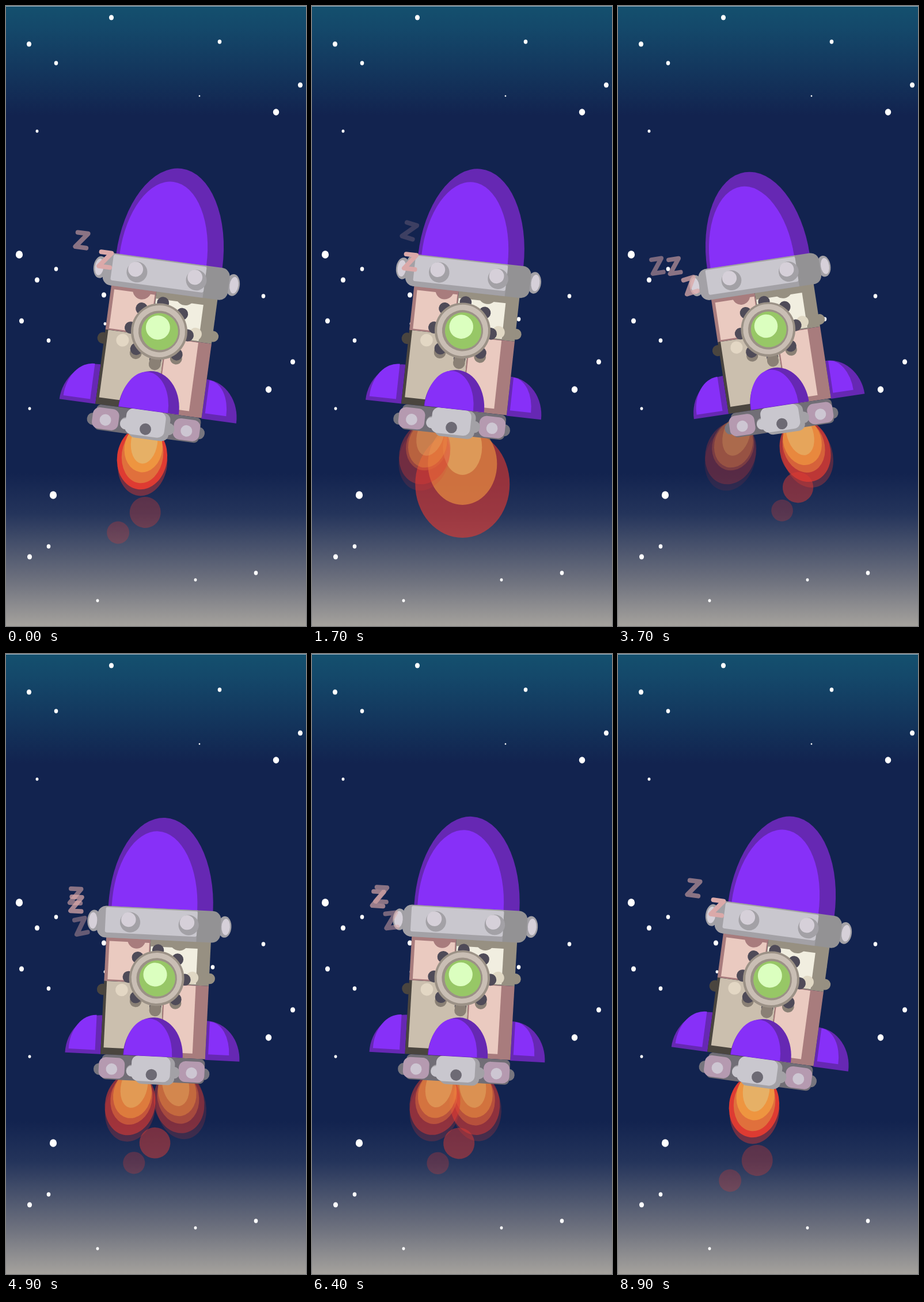
Write an HTML page with a canvas that moves like this. It is 521x1075 px and loops after 9 s.

```html
<!DOCTYPE html>
<html lang="en">
<head>
<meta charset="utf-8">
<title>Rocket</title>
<style>
html, body { margin: 0; width: 100%; height: 100%; overflow: hidden; background: #12234f; }
canvas { display: block; }
</style>
</head>
<body>
<canvas id="stage" width="521" height="1075"></canvas>
<script>
const W = 521, H = 1075, LOOP = 9, TAU = Math.PI * 2;
const g = document.getElementById('stage').getContext('2d');

const C = {
  violet: '#8730f8', plum: '#6628b3', pink: '#eacac0', rose: '#a87c7d', cream: '#f1eee0',
  stone: '#979082', sand: '#cbbfae', coal: '#4a453f', steel: '#a3a1a6', silver: '#c9c7ce',
  pearl: '#d6d0d9', stud: '#4f4b58', shade: '#8a8075', rim: '#9b9186',
  red: '#de3b32', ember: '#e0703c', orange: '#ee9540', gold: '#e6b066'
};

const rad = deg => deg * Math.PI / 180;
const mix = (a, b, k) => a + (b - a) * k;
const clamp = v => Math.min(1, Math.max(0, v));

// The rocket swings between these times and angles; the rest of a pose follows from its angle
const swing = [
  [0, 7.7], [0.5, -17], [1.3, 17.4], [1.98, 0], [2.5, -12], [3.1, 17.4], [4, -17], [4.58, 12.9],
  [5.3, -11.4], [6.05, 13.4], [6.75, -6.7], [7.4, -6.7], [8, 15], [8.5, -4], [8.9, 7.7], [LOOP, 7.7]
];
const poses = swing.map(([t, deg]) => ({
  t, deg,
  a: Math.cos(rad(deg)), b: Math.sin(rad(deg)),
  x: 261.3 + 4.8 * Math.sin(rad(deg * 10)),
  y: 562 + 2.4 * Math.sign(deg),
  big: deg === 0 ? 1 : 0,
  drift: deg < 0 ? 0.6 : clamp((17.4 - deg) / 9.7),
  zs: 2 - Math.sign(deg) * (deg < 0 ? 1 : 0) - (deg === 0 ? 1 : 0)
}));

const place = m => g.setTransform(m.a, m.b, -m.b, m.a, m.x, m.y);
const blend = (p, q, k) => ({
  a: mix(p.a, q.a, k), b: mix(p.b, q.b, k), x: mix(p.x, q.x, k), y: mix(p.y, q.y, k)
});

function oval(x, y, rx, ry, fill, from = 0, to = TAU) {
  g.fillStyle = fill;
  g.beginPath();
  g.ellipse(x, y, rx, ry, 0, from, to);
  g.fill();
}
const dot = (x, y, r, fill) => oval(x, y, r, r, fill);
const dome = (x, y, rx, ry, fill) => oval(x, y, rx, ry, fill, Math.PI, TAU);

// Rectangle given by its edges
function box(l, t, r, b, fill, radius = 0) {
  g.fillStyle = fill;
  g.beginPath();
  g.roundRect(l, t, r - l, b - t, radius);
  g.fill();
}

// Quarter ellipse with its right angle at x, y; negative rx points left
function fin(x, y, rx, ry, fill) {
  g.fillStyle = fill;
  g.beginPath();
  g.moveTo(x, y);
  g.ellipse(x, y, Math.abs(rx), ry, 0, -Math.PI / 2, rx < 0 ? -Math.PI : 0, rx < 0);
  g.fill();
}

// Star positions by radius
const stars = {
  6.3: [[23, 431], [82, 848]],
  5.4: [[469, 184], [456, 665]],
  4.2: [[183, 20], [40, 66], [511, 137], [170, 501], [27, 546], [498, 617], [54, 475], [41, 955]],
  3.4: [[371, 62], [87, 99], [87, 456], [447, 503], [359, 543], [74, 580], [74, 937], [434, 983]],
  2.5: [[54, 217], [172, 551], [41, 698], [329, 995], [159, 1031]],
  1.4: [[336, 156]]
};

const sky = g.createLinearGradient(0, 0, 0, H);
[[0, '#14506e'], [40, '#14486a'], [190, '#12234f'], [810, '#12234f'],
 [880, '#24345b'], [1000, '#70737f'], [H, '#a5a29d']]
  .forEach(([y, c]) => sky.addColorStop(y / H, c));

function drawSky() {
  g.setTransform(1, 0, 0, 1, 0, 0);
  g.fillStyle = sky;
  g.fillRect(0, 0, W, H);
  box(0, 0, W, 1, '#a3b8c5');
  for (const r in stars) stars[r].forEach(([x, y]) => oval(x, y, r * 0.97, r * 1.07, '#fff'));
}

function drawFlame(pose, alpha) {
  const d = pose.drift;
  place(pose);
  g.globalAlpha = alpha;
  if (pose.big) {
    oval(0, 267, 82, 93, C.red);
    oval(0, 232, 60, 71, C.orange);
    oval(0, 203, 34, 48, C.gold);
  } else {
    g.globalAlpha = alpha * 0.45;
    oval(2, 230, 43, 57, C.red);
    g.globalAlpha = alpha;
    oval(0, 221, 43.5, 55, C.red);
    oval(0, 207 + 9 * d, 36, 44 + 5 * d, C.ember);
    oval(0, 204, 33, 42, C.orange);
    oval(0, 187 + 6 * d, 23, 38, C.gold);
  }
  g.globalAlpha = 1;
}

function drawSmoke(m, d, show) {
  place(m);
  g.globalAlpha = show * (0.65 - 0.33 * d);
  dot(4 + 14 * d, 267 + 47 * d, 28 - d, C.red);
  g.globalAlpha = show * clamp(d * 3) * 0.28;
  dot(-24, 300 + 55 * d, 19.5, C.red);
  g.globalAlpha = 1;
}

function drawFins() {
  fin(-93, 139, -63, 69, C.plum);
  fin(-103, 132, -47, 62, C.violet);
  fin(93, 140, 61, 69, C.plum);
  fin(98, 130, 37, 58, C.violet);
}

function drawBase() {
  box(-104, 155, 102, 176, '#77757e', 10);
  box(-90, 139, 93, 183, '#716e76', 8);
  for (const x of [-72, 70]) {
    box(x - 23, 144, x + 23, 181, '#b59ab0', 12);
    dot(x, 164.5, 10, '#cdc6d2');
  }
  box(-30, 139, 40, 188, C.steel, 12);
  box(-46, 155, 49, 176, C.steel, 10);
  box(-46, 157, 10, 176, C.silver, 10);
  box(-37, 138, 32, 183, C.silver, 12);
  dot(-1, 171, 10, '#6d6a74');
}

function drawBody() {
  dot(-95, 24, 10, C.coal);
  dot(94, -4, 9.5, C.stone);
  box(-93, -70, -14, 9, C.rose);
  box(-87, -62, -16, 6, C.pink);
  box(-14, -70, 93, 9, C.stone);
  box(-13, -56, 70, 7, C.cream);
  box(-93, 9, 14, 139, C.coal);
  box(-88, 9, 13, 127, C.sand);
  box(13, 9, 93, 139, C.rose);
  box(15, 10, 70, 130, C.pink);
  dot(-39, -67, 16, C.rose);
  dot(37, -68, 17, C.stone);
  dot(-61, 23.5, 11, '#e3d7c4');
  dot(63, -4, 11, '#e0d8c4');
}

function drawPorthole() {
  const ring = (dy, fill, from, to) => {
    for (let i = from; i < to; i++) {
      const a = i * TAU / 8;
      dot(50 * Math.cos(a), 50 * Math.sin(a) + dy, 10.5, fill);
    }
  };
  ring(7, C.shade, 1, 4);
  ring(0, C.stud, 0, 8);
  dot(0, 53, 10, C.shade);
  dot(0, 0, 49, C.rim);
  dot(0, -0.5, 45, '#c9beb4');
  dot(0, 0, 36, C.rim);
  dot(1, 0, 32, '#97c766');
  dot(-3, -6.5, 21, '#dbffbf');
}

function drawBand() {
  for (const side of [-1, 1]) {
    oval(side * 116, -97, 12, 19, C.steel);
    oval(side * 118, -97, 7.5, 14.5, C.pearl);
  }
  box(-110, -124, 109, -68, '#939294', 15);
  box(-110, -124, 67, -68, C.steel, [15, 0, 0, 15]);
  box(-96, -122, 67, -77, C.silver, 3);
  for (const x of [-55, 49]) {
    dot(x + 3, -97, 18, C.steel);
    dot(x, -101.5, 13, C.pearl);
  }
}

function drawRocket(m) {
  place(m);
  drawFins();
  drawBody();
  drawBase();
  drawPorthole();
  dome(0, 138.5, 53, 69, C.plum);
  dome(-9, 138, 43, 66, C.violet);
  dome(1, -123, 93, 162, C.plum);
  dome(-10, -124, 76, 136.5, C.violet);
  drawBand();
}

function drawZ(z, alpha) {
  place(z);
  g.globalAlpha = alpha;
  g.strokeStyle = '#dba9a9';
  g.lineWidth = 8;
  g.lineCap = g.lineJoin = 'round';
  g.beginPath();
  g.moveTo(-8, -12.5);
  g.lineTo(10, -12.5);
  g.lineTo(-9, 12.5);
  g.lineTo(10, 12.5);
  g.stroke();
  g.globalAlpha = 1;
}

// Letters trail up and left, each fainter than the last
function trail(pose) {
  const list = Array.from({ length: pose.zs }, (_, i) => {
    const x = -110 - 45 * i + 14 * (1 - pose.drift) ** 2, y = -111 - 28 * i;
    return {
      a: pose.a, b: pose.b, alpha: 0.6 ** i,
      x: pose.x + x * pose.a - y * pose.b,
      y: pose.y + x * pose.b + y * pose.a
    };
  });
  return pose.zs === 3 ? list.reverse() : list;
}

// Paired letters glide, the others dissolve
function drawLetters(p, q, k) {
  const from = trail(p), to = trail(q);
  for (let i = 0; i < Math.max(from.length, to.length); i++) {
    const s = from[i], e = to[i];
    if (s && e) drawZ(blend(s, e, k), mix(s.alpha, e.alpha, k));
    else if (s) drawZ(s, s.alpha * (1 - k));
    else drawZ(e, e.alpha * k);
  }
}

function draw(t) {
  const i = poses.findIndex(p => p.t > t);
  const p = poses[i - 1], q = poses[i];
  const k = 0.5 - 0.5 * Math.cos(Math.PI * (t - p.t) / (q.t - p.t));
  const m = blend(p, q, k);

  drawSky();
  drawSmoke(m, mix(p.drift, q.drift, k), clamp(1 - 1.6 * mix(p.big, q.big, k)));
  if (p.deg === q.deg) {
    drawFlame(p, 1);
  } else {
    drawFlame(q, k);
    drawFlame(p, 1 - k);
  }
  drawRocket(m);
  drawLetters(p, q, k);
}

const start = performance.now();
function tick() {
  draw((performance.now() - start) / 1000 % LOOP);
  requestAnimationFrame(tick);
}
tick();
</script>
</body>
</html>
```
